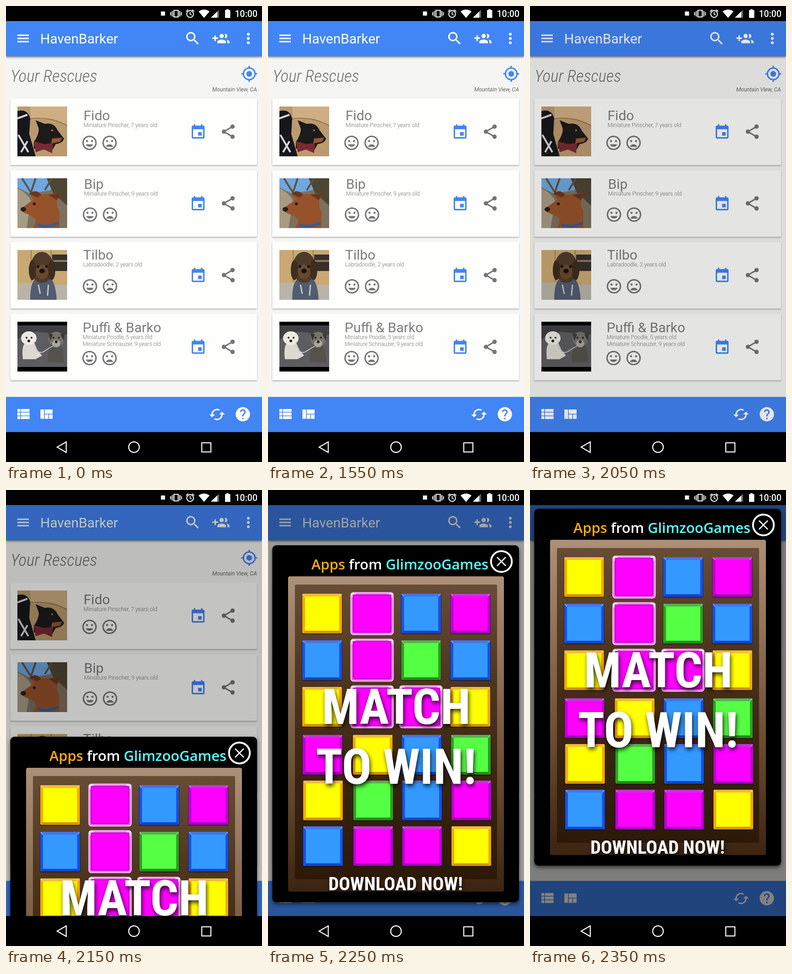
An HTML page that plays this animation: 561 px wide and 998 px high, repeating every 4.3 s.

```html
<!DOCTYPE html>
<html lang="en">
<head>
<meta charset="utf-8">
<title>Pet list with pop-up ad</title>
<style>
html, body { margin: 0; height: 100%; overflow: hidden; background: #000; }
svg { display: block; width: 561px; height: 998px; font-family: Roboto, sans-serif; }
.cond { font-family: "Roboto Condensed", Roboto, sans-serif; font-stretch: 75%; }
.heading { font-size: 37px; font-weight: 300; font-style: italic; fill: #6c6c6c; }
.place { font-size: 12.2px; font-style: italic; fill: #666; text-anchor: end; }
.small { font-size: 12.15px; font-weight: 300; fill: #707070; }
.name { font-size: 30px; fill: #7c7c7c; }
.shout { font-weight: 700; fill: #fff; text-anchor: middle; filter: drop-shadow(2px 5px 5px #000c); }
.ad { font: 600 31px "Open Sans", sans-serif; }
.row { filter: drop-shadow(0 2px 1.5px #0004); }
</style>
</head>
<body>
<svg id="stage" viewBox="0 0 561 998"></svg>
<script>
const BLUE = '#4285f4', GREY = '#747474';

// 24-unit icon paths
const ICONS = {
  menu: 'M3 18h18v-2H3zM3 13h18v-2H3zM3 6v2h18V6z',
  search: 'M15.5 14h-.79l-.28-.27A6.5 6.5 0 1 0 13.73 14.43l.27.28v.79l5 4.99L20.49 19zM9.5 14a4.5 4.5 0 1 1 0-9 4.5 4.5 0 0 1 0 9z',
  addGroup: 'M8 10H5V7H3v3H0v2h3v3h2v-3h3zM18 11a3 3 0 1 0-.91-5.86 5 5 0 0 1 0 5.72c.28.09.59.14.91.14zM13 11a3 3 0 1 0 0-6 3 3 0 0 0 0 6zM19.62 13.16c.83.73 1.38 1.66 1.38 2.84v2h3v-2c0-1.54-2.37-2.49-4.38-2.84zM13 13c-2 0-6 1-6 3v2h12v-2c0-2-4-3-6-3z',
  more: 'M12 4a2 2 0 1 0 .01 0zM12 10a2 2 0 1 0 .01 0zM12 16a2 2 0 1 0 .01 0z',
  event: 'M17 12h-5v5h5zM16 1v2H8V1H6v2H5a2 2 0 0 0-2 2v14a2 2 0 0 0 2 2h14a2 2 0 0 0 2-2V5a2 2 0 0 0-2-2h-1V1zM19 19H5V8h14z',
  list: 'M4 14h4v-4H4zM4 19h4v-4H4zM4 9h4V5H4zM9 14h12v-4H9zM9 19h12v-4H9zM9 5v4h12V5z',
  quilt: 'M10 18h5v-6h-5zM4 18h5V5H4zM16 18h5v-6h-5zM10 5v6h11V5z',
  refresh: 'M19 8l-4 4h3a6 6 0 0 1-8.8 5.3l-1.46 1.46A8 8 0 0 0 20 12h3zM6 12a6 6 0 0 1 8.8-5.3l1.46-1.46A8 8 0 0 0 4 12H1l4 4 4-4z',
  help: 'M12 2a10 10 0 1 0 .01 0zM13 19h-2v-2h2zM15.07 11.25l-.9.92C13.45 12.9 13 13.5 13 15h-2v-.5c0-1.1.45-2.1 1.17-2.83l1.24-1.26c.37-.36.59-.86.59-1.41a2 2 0 0 0-4 0H8a4 4 0 0 1 8 0c0 .88-.36 1.68-.93 2.25z'
};

const at = (x, y, s, body) => `<g transform="translate(${x} ${y}) scale(${s})">${body}</g>`;
const icon = (name, x, y, s = 1.57, fill = '#fff') =>
  at(x, y, s, `<path transform="translate(-12 -12)" fill="${fill}" fill-rule="evenodd" d="${ICONS[name]}"/>`);
const rect = (x, y, w, h, fill, more = '') =>
  `<rect x="${x}" y="${y}" width="${w}" height="${h}" fill="${fill}" ${more}/>`;
const circle = (x, y, r, fill, more = '') => `<circle cx="${x}" cy="${y}" r="${r}" fill="${fill}" ${more}/>`;
const oval = (x, y, rx, ry, fill) => `<ellipse cx="${x}" cy="${y}" rx="${rx}" ry="${ry}" fill="${fill}"/>`;
const path = (d, fill, more = '') => `<path d="${d}" fill="${fill}" ${more}/>`;
const line = (d, color, width) => path(d, 'none', `stroke="${color}" stroke-width="${width}"`);
const text = (x, y, str, more) => `<text x="${x}" y="${y}" ${more}>${str}</text>`;

const face = (x, y, mouth) => at(x, y, 1.58,
  circle(0, 0, 9, 'none', `stroke="${GREY}" stroke-width="2"`) +
  circle(-3.5, -2.5, 1.5, GREY) + circle(3.5, -2.5, 1.5, GREY) + path(mouth, GREY));
const SMILE = 'M-5.1 2H5.1A5.5 5.5 0 0 1-5.1 2z', FROWN = 'M-5.1 5.5H5.1A5.5 5.5 0 0 0-5.1 5.5z';

const share = (x, y) => at(x, y, 1.58,
  line('M6-7-6 0 6 7', GREY, 2) + circle(6, -7, 3, GREY) + circle(-6, 0, 3, GREY) + circle(6, 7, 3, GREY));

const target = (x, y) => at(x, y, 1.59,
  circle(0, 0, 4, BLUE) + circle(0, 0, 8, 'none', `stroke="${BLUE}" stroke-width="2"`) +
  line('M0-11v3M0 8v3M-11 0h3M8 0h3', BLUE, 2));

// Flat pictures, 109 units square
const PHOTOS = [
  rect(0, 0, 109, 109, '#bb9a70') + path('M28 0H109V40Q70 22 30 30z', '#cfae83') +
  line('M24 28Q70 20 109 42', '#92714b', 2) + path('M0 10Q22 4 28 26L26 60 40 109H0z', '#17171b') +
  line('M0 26l22-8M2 62l22 38M22 76L8 100', '#d8d8d8', 4) +
  path('M36 92V78Q50 56 46 46L40 30 60 38Q80 34 88 52L102 70Q100 80 84 82L76 96z', '#1d1a1a') +
  path('M76 70l22-2-4 9-20 4z', '#96592f') + path('M36 76L58 82 78 80 76 102 58 94 40 100z', '#7a2a31') +
  circle(76, 52, 2, '#b67a3d'),
  rect(0, 0, 109, 109, '#7d705d') + path('M0 0H90L72 26 28 34 0 20z', '#6fa7df') +
  path('M0 22Q24 34 30 50L20 109H0z', '#a89b84') + path('M64 0H109V60L78 32z', '#4e4635') +
  line('M10 0L34 38M40 0L30 30M76 0L60 26', '#5d5140', 4) +
  path('M34 109Q46 90 34 84L12 74Q8 66 14 62L36 46 26 34Q40 22 52 36L72 34 96 32 88 46Q84 60 92 72V109z', '#96522a') +
  path('M26 34Q40 22 52 36L44 42zM68 36L97 32 86 48z', '#6c351e') + oval(13, 68, 6, 5, '#2b1c18') +
  circle(37, 56, 3, '#1c1412') + line('M44 101Q64 110 90 98', '#385b91', 6),
  rect(0, 0, 109, 109, '#c9a873') + line('M30 0V70M74 0V60', '#9d7e50', 2) +
  rect(76, 10, 33, 36, '#35302b') + rect(78, 22, 31, 4, '#8f7b60') + path('M0 72H34V109H0zM78 76H109V109H78z', '#b9b4a9') +
  path('M28 109Q28 68 42 62H72Q84 72 86 109z', '#515c70') + oval(54, 38, 25, 34, '#503b28') +
  oval(33, 44, 8, 22, '#3f2d1d') + oval(75, 44, 8, 22, '#3f2d1d') + oval(54, 48, 14, 16, '#67492f') +
  circle(45, 36, 3, '#17110d') + circle(64, 36, 3, '#17110d') + oval(54, 46, 6, 5, '#17110d') +
  line('M46 76l4 20M68 76l-2 24', '#c6c8cb', 3),
  rect(0, 0, 109, 109, '#000') + rect(0, 8, 109, 91, '#5d5c60') + path('M0 8H109V28L40 22 0 38z', '#414044') +
  path('M12 82Q8 50 20 44H36L44 62 54 74 40 82z', '#ddd9d0') + oval(25, 36, 17, 15, '#eeeae2') +
  path('M66 88Q66 56 76 48H94Q104 66 102 90z', '#55524e') + oval(85, 38, 17, 16, '#77726b') +
  path('M68 24l10 4-6 14zM94 28l10-4-2 18z', '#3c3935') + oval(85, 48, 9, 8, '#aca69b') +
  [20, 31, 79, 91].map(x => circle(x, 35, 2, '#161616')).join('') + circle(25, 42, 3, '#222') + circle(85, 44, 3, '#222') +
  line('M36 44Q42 76 60 64T78 54', '#c4c8d2', 2)
];

const PETS = [
  { name: 'Fido', x: 170, y: 250, notes: ['Miniature Pinscher, 7 years old'] },
  { name: 'Bip', x: 171, y: 400, notes: ['Miniature Pinscher, 9 years old'] },
  { name: 'Tilbo', x: 169, y: 555, notes: ['Labradoodle, 2 years old'] },
  { name: 'Puffi &amp; Barko', x: 168, y: 714, notes: ['Miniature Poodle, 5 years old', 'Miniature Schnauzer, 9 years old'] }
];

const petRow = ({ name, x, y, notes }, i) => {
  const dy = 157 * i, fx = i % 3 ? 184 : 183;
  return rect(9.5, 203 + dy, 540.5, 145, '#fefefc', 'rx="1.5" class="row"') +
    `<svg x="25" y="${220 + dy}" width="109" height="109">${PHOTOS[i]}</svg>` +
    text(x, y, name, 'class="name"') +
    notes.map((n, k) => text(x, y + 15 + 15 * k, n, 'class="small"')).join('') +
    face(fx, 299.5 + dy, SMILE) + face(fx + 44, 299.5 + dy, FROWN) +
    icon('event', 421, 276 + dy, 1.57, BLUE) + share(487, 275 + dy);
};

const app = rect(0, 33, 561, 900, '#f5f5f3') +
  rect(0, 33, 561, 77, BLUE, 'style="filter:drop-shadow(0 2px 2px #0008)"') +
  icon('menu', 37.5, 71, 1.4) + text(75, 82, 'HavenBarker', 'font-size="30" fill="#fff"') +
  icon('search', 409, 71) + icon('addGroup', 471, 72) + icon('more', 531, 71) +
  text(10, 166, 'Your Rescues', 'class="cond heading"') +
  target(533, 148.5) +
  text(550, 187, 'Mountain View, CA', 'class="place"') +
  PETS.map(petRow).join('') +
  rect(0, 855.5, 561, 78, BLUE) +
  icon('list', 37.5, 893) + icon('quilt', 88, 894) + icon('refresh', 462.5, 894, 1.55) + icon('help', 519, 893.5);

const TILE = { // face, edge
  Y: ['#ff0', '#f2a900'], B: ['#39f', '#1750e6'], M: ['#f0f', '#b800d0'], G: ['#5f4', '#2ba01f']
};
const BOARD = ['YmBM', 'BmGB', 'YmmY', 'MYBG', 'YGBM', 'BMMY'];
const COLS = [75, 185, 292, 400], ROWS = [147, 249, 351, 456, 556, 656];

const tile = (key, col, row) => {
  const x = COLS[col] + (row > 3 ? 2 : row > 2 ? 1 : 0), y = ROWS[row];
  const [fill, edge] = TILE[key.toUpperCase()];
  if (key === 'm') // highlighted
    return rect(x - 3, y - 2, 92, 91, '#e860e8', 'rx="5" stroke="#ffb0ff" stroke-width="3"') +
      rect(x + 2, y + 3, 82, 81, fill, 'rx="3" stroke="#c400d0" stroke-width="2"') +
      line(`M${x - 1} ${y + 8}v-8h8M${x + 79} ${y}h8v8`, '#fff', 2);
  return rect(x - 1, y + 1, 89, 88, '#0006', 'rx="4"') + rect(x, y, 87, 87, edge, 'rx="3"') +
    path(`M${x + 1} ${y}h85l-6 6H${x + 7}z`, '#fff3') + path(`M${x + 1} ${y + 87}h85l-6-6H${x + 7}z`, '#0002') +
    rect(x + 6, y + 6, 75, 75, fill) + line(`M${x + 1} ${y + 1}l5 5M${x + 86} ${y + 1}l-5 5`, '#fff8', 1.5);
};

const gradient = (id, ...stops) => `<linearGradient id="${id}" x2="0" y2="1">` +
  stops.map((c, i) => `<stop offset="${i / (stops.length - 1)}" stop-color="${c}"/>`).join('') + '</linearGradient>';

const ad = rect(9.5, 41, 540.5, 781, '#000', 'rx="9" style="filter:drop-shadow(0 4px 4px #0009)"') +
  text(95, 94, '<tspan fill="#f8ac08">Apps</tspan> from <tspan fill="#5cfcfc">GlimzooGames</tspan>', 'class="ad" fill="#fff"') +
  rect(44, 109, 473, 690, 'url(#rim)', 'rx="4"') +
  rect(59, 127, 443, 645, 'url(#well)', 'rx="2"') +
  BOARD.map((keys, row) => [...keys].map((k, col) => tile(k, col, row)).join('')).join('') +
  text(281, 432, 'MATCH', 'class="cond shout" font-size="108"') +
  text(280.5, 563, 'TO WIN!', 'class="cond shout" font-size="108"') +
  text(279.5, 796, 'DOWNLOAD NOW!', 'class="cond shout" font-size="41"') +
  circle(511.5, 76.5, 22.8, '#000', 'stroke="#fff" stroke-width="4"') +
  line('M502 67l19 19M521 67l-19 19', '#fff', 2.6);

const statusBar = rect(0, 0, 561, 33, '#000') + rect(339.5, 12, 9, 9, '#fff') +
  path('M368 9.5h9.5v14.5h-9.5z', 'none', 'stroke="#fff" stroke-width="2.2"') +
  line('M364.5 11v12M361 13.5v7M381 11v12M384.5 13.5v7', '#fff', 2) +
  circle(403.5, 17.5, 7.4, 'none', 'stroke="#fff" stroke-width="2"') +
  line('M403.5 13v5l3.5 2M394.5 12l5-4M412.5 12l-5-4', '#fff', 1.8) +
  path('M422 12Q434 3.5 446 12L434 26z', '#fff') +
  path('M449 25.5H467V8z', '#666') + path('M449 25.5H463V12z', '#fff') +
  path('M483 7h5v2h3.5v17h-11.5V9h3z', '#fff') +
  text(551, 24, '10:00', 'font-size="19.5" font-weight="500" fill="#fff" text-anchor="end"');

const navBar = rect(0, 932.5, 561, 66, '#000') + '<circle id="ripple" cx="280.5" cy="965" fill="#fff"/>' +
  path('M132 954v23l-20-11.5z', 'none', 'stroke="#fff" stroke-width="2.2"') +
  circle(280.5, 965.5, 11.6, 'none', 'stroke="#fff" stroke-width="2.2"') +
  rect(429, 956, 20, 20, 'none', 'stroke="#fff" stroke-width="2.2"');

const $ = id => document.getElementById(id);
$('stage').innerHTML = '<defs>' + gradient('rim', '#ad9077', '#8b6d53', '#67492f', '#3c2411') +
  gradient('well', '#674d36', '#4d351f', '#3b2411', '#2c1908') + '</defs>' + app +
  '<rect id="dim" y="33" width="561" height="900"/>' + `<g id="ad">${ad}</g>` + statusBar + navBar;

const LOOP = 4300, STEP = 50;

function draw(now) {
  const t = Math.floor(now % LOOP / STEP) * STEP;

  const fade = (t - 1350) / 200;
  $('ripple').setAttribute('r', 26.5 + 2 * Math.min(1, Math.max(0, fade)));
  $('ripple').setAttribute('opacity', fade >= 0 && fade < 1 ? 0.14 * (1 - fade) : 0);

  $('dim').setAttribute('opacity', t < 2050 ? 0 : Math.min(0.49, 0.1 + 0.39 * (t - 2050) / 300));

  const left = Math.max(0, 2342.6 - t) / 92.6;
  $('ad').setAttribute('transform', `translate(0 ${80 * left ** 2.5})`);
  $('ad').setAttribute('visibility', t < 2100 ? 'hidden' : 'visible');
}

function tick() {
  draw(performance.now());
  requestAnimationFrame(tick);
}
tick();
</script>
</body>
</html>
```
